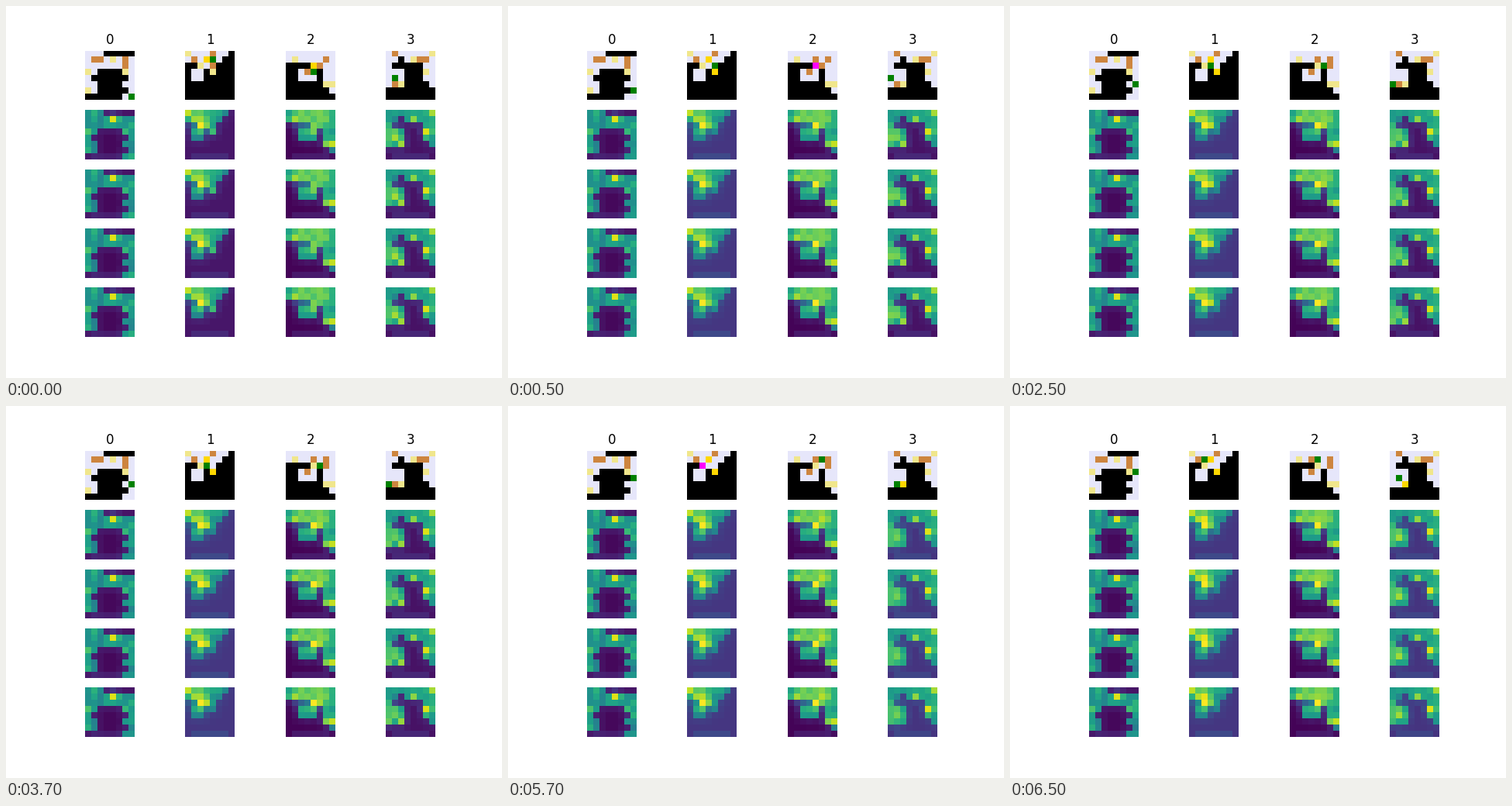
A matplotlib script for the animation above (8 s loop, 640 by 480 pixels).

```python
import matplotlib.pyplot as plt
import numpy as np
from matplotlib.animation import FuncAnimation
from matplotlib.colors import to_rgb

SIZE, STEPS = 8, 5
DIRECTIONS = {"U": (-1, 0), "D": (1, 0), "L": (0, -1), "R": (0, 1)}
ROWS, COLS = np.mgrid[:SIZE, :SIZE]

# Walls are blocks (top, bottom, left, right), ends included.
# Glows are soft bright areas (row, column, gain, radius).
LEVELS = [
    dict(
        walls=[(0, 0, 3, 7), (3, 6, 2, 5), (4, 4, 1, 6), (6, 6, 6, 6), (7, 7, 0, 5)],
        targets=[(1, 4), (3, 0), (3, 6), (6, 0)],
        boxes=[(1, 1), (1, 2), (1, 6), (2, 6)],
        player=(7, 7), moves="UUUU",
        floor=.54, dark=.02, goal=.14, glows=[(1, 4.2, .35, .6)],
    ),
    dict(
        walls=[(0, 7, 7, 7), (1, 7, 6, 6), (2, 7, 5, 5), (2, 2, 0, 1),
               (3, 4, 0, 0), (3, 3, 3, 3), (4, 4, 3, 4), (5, 7, 0, 7)],
        targets=[(0, 0), (1, 3), (2, 2), (3, 4)],
        boxes=[(0, 4), (1, 1), (1, 3), (2, 4)],
        player=(1, 4), moves="DLLU",
        floor=.5, dark=.06, goal=.25, glows=[(2.2, 2.1, .32, 1), (0, 1.5, .28, 1.4)],
    ),
    dict(
        walls=[(2, 2, 0, 3), (3, 4, 0, 1), (3, 4, 5, 5), (5, 6, 0, 5),
               (6, 6, 6, 6), (7, 7, 0, 7)],
        targets=[(1, 1), (2, 4), (5, 6), (5, 7)],
        boxes=[(1, 6), (2, 4), (2, 5), (3, 3)],
        player=(3, 4), moves="URUL",
        floor=.57, dark=.01, goal=.32, glows=[(0, 4.5, .2, 2), (2, 2.5, .22, 1)],
    ),
    dict(
        walls=[(1, 2, 2, 2), (2, 2, 1, 5), (3, 5, 3, 5), (5, 5, 6, 6), (6, 7, 0, 7)],
        targets=[(0, 7), (1, 4), (3, 6), (5, 2)],
        boxes=[(0, 1), (1, 5), (1, 6), (5, 1)],
        player=(4, 1), moves="LDRU",
        floor=.56, dark=.05, goal=.28, glows=[(3.5, .7, .27, 1), (3, 6.5, .18, .7)],
    ),
]


def wall_mask(level):
    mask = np.zeros((SIZE, SIZE), bool)
    for top, bottom, left, right in level["walls"]:
        mask[top:bottom + 1, left:right + 1] = True
    return mask


def play(level, step):
    """Push boxes along the first moves; return the player and the boxes."""
    player, boxes = level["player"], set(level["boxes"])
    for move in level["moves"][:step]:
        dr, dc = DIRECTIONS[move]
        player = player[0] + dr, player[1] + dc
        if player in boxes:
            boxes.remove(player)
            boxes.add((player[0] + dr, player[1] + dc))
    return player, boxes


def board_image(level, step):
    player, boxes = play(level, step)
    targets = set(level["targets"])
    image = np.full((SIZE, SIZE, 3), to_rgb("lavender"))
    image[wall_mask(level)] = to_rgb("black")
    for cell in targets | boxes:
        color = "khaki" if cell not in boxes else "gold" if cell in targets else "peru"
        image[cell] = to_rgb(color)
    image[player] = to_rgb("magenta" if player in targets else "green")
    return image


def bump(row, col, gain, radius):
    return gain * np.exp(-((ROWS - row) ** 2 + (COLS - col) ** 2) / (2 * radius ** 2))


def value_map(level, step):
    """Softened floor plan, brighter at open targets, glows and the player."""
    player, boxes = play(level, step)
    targets = set(level["targets"])
    walls = wall_mask(level)
    gained = len(targets & boxes) - len(targets & set(level["boxes"]))
    dark = level["dark"] + .1 * max(0, gained)

    pad = np.pad(~walls * 1.0, 1, mode="edge")
    around = sum(pad[r:r + SIZE, c:c + SIZE] for r in range(3) for c in range(3)) / 9
    openness = .8 * ~walls + .2 * around
    heat = dark + (level["floor"] - dark) * openness
    heat[-1, 1:-1] += .06
    for glow in level["glows"]:
        heat += bump(*glow)
    for target in targets - boxes:
        heat += bump(*target, level["goal"], .45)
    heat += bump(*player, .1, .6)
    texture = np.random.default_rng(level["player"]).normal(0, .04, walls.shape)
    return np.clip(heat + texture * ~walls, 0, 1)


fig, axes = plt.subplots(5, 4, figsize=(6.4, 4.8), dpi=100)
layers = []
for col, level in enumerate(LEVELS):
    boards = [board_image(level, step) for step in range(STEPS)]
    heats = [value_map(level, step) for step in range(STEPS)]
    axes[0, col].set_title(str(col))
    for row, ax in enumerate(axes[:, col]):
        ax.axis("off")
        states = heats if row else boards
        layers.append((ax.imshow(states[0], cmap="viridis", vmin=0, vmax=1), states))


def update(frame):
    step = (frame + 3) // 4
    for image, states in layers:
        image.set_data(states[step])
    return [image for image, _ in layers]


anim = FuncAnimation(fig, update, frames=16, interval=500, repeat=True)
plt.show()
```
